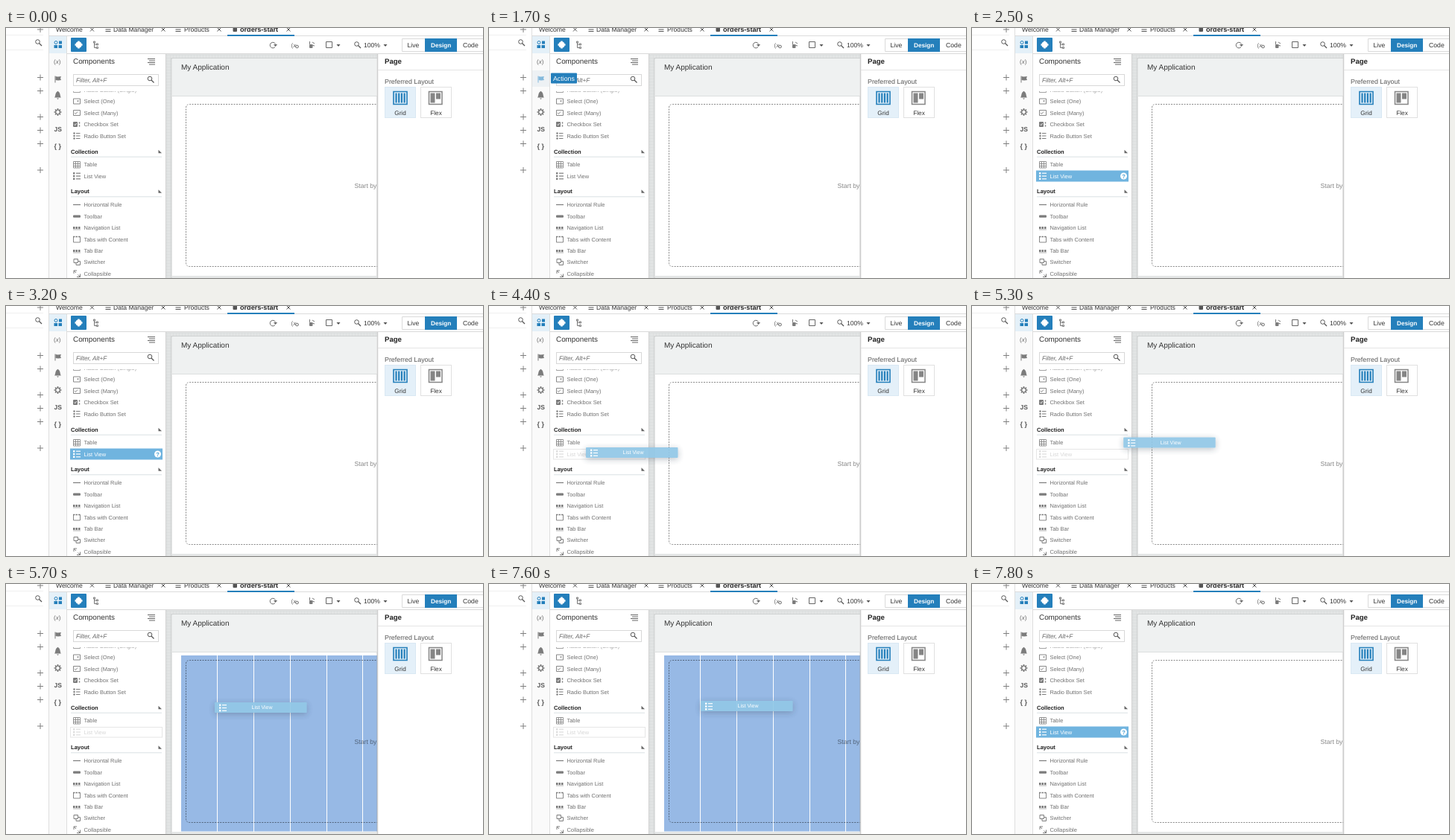
An HTML page that plays this animation: 640x336 px, repeating every 8 s.

```html
<!DOCTYPE html>
<html lang="en">
<head>
<meta charset="utf-8">
<title>Component drag</title>
<style>
html, body { margin: 0; width: 100%; height: 100%; overflow: hidden; background: #fff; }
svg { display: block; width: 640px; height: 336px; }
text { font-family: "Liberation Sans", Arial, sans-serif; text-rendering: geometricPrecision; white-space: pre; }
.b { font-weight: bold; }
.overlay { mix-blend-mode: multiply; }
</style>
</head>
<body>
<svg id="stage" viewBox="0 0 640 336" xmlns="http://www.w3.org/2000/svg"></svg>
<script>
const BLUE = '#247fbb', ICON = '#7c7c7c', DARK = '#333', HOVER = '#70b4df';

const text = (x, y, size, str, fill = DARK, extra = '') =>
  `<text x="${x}" y="${y}" font-size="${size}" fill="${fill}" ${extra}>${str}</text>`;
const rect = (x, y, w, h, fill, extra = '') =>
  `<rect x="${x}" y="${y}" width="${w}" height="${h}" fill="${fill}" ${extra}/>`;
const path = (d, stroke = ICON, width = 1, extra = '') =>
  `<path d="${d}" stroke="${stroke}" stroke-width="${width}" fill="none" ${extra}/>`;
const solid = (d, fill = ICON) => `<path d="${d}" fill="${fill}"/>`;
const circle = (x, y, r, fill, stroke = 'none') =>
  `<circle cx="${x}" cy="${y}" r="${r}" fill="${fill}" stroke="${stroke}"/>`;
const group = (id, body, extra = '') => `<g id="${id}" ${extra}>${body}</g>`;
const at = (x, y, body) => `<g transform="translate(${x} ${y})">${body}</g>`;

const plus = y => path(`M42 ${y}h8M46 ${y - 4}v8`, '#808080');
const cross = x => path(`M${x - 2.5} -.5l5 5m0-5l-5 5`, '#555');
const menu = x => path(`M${x - 3.5} -.5h7m-7 2.5h7m-7 2.5h7`, '#555', 1.2);
const lens = (x, y, c = '#555') =>
  circle(x - 1, y - 1, 2.8, 'none', c) + path(`M${x + 1} ${y + 1}l3.5 3.5`, c, 1.3);
const caret = (x, y) => solid(`M${x - 2.5} ${y - 1}h5l-2.5 3z`, '#555');

// Small palette icons, each drawn around its own centre.
const frame = 'M-4.5-3.5h9v7h-9z';
const lines = 'M-1-3.500h5.500M-1 0h5.500M-1 3.500h5.500';
const blocks = c => path('M-5 0h2.500m1 0h2.500m1 0h2.500', c, 3) + path('M-5 2.500h10', c, .6);
const icons = {
  select: c => path(frame, c, .9) + solid('M0-1h3l-1.500 2z', c),
  many: c => path(frame, c, .9) + path('M-3 0l1.500 1.500 2.500-3', c, .9),
  check: c => rect(-5, -3.5, 6, 7, c, 'rx="1"') + path('M-3.500 0l1.200 1.300 2-2.800', '#fff', .9) + path('M3.500-3v2m0 2v2', c, 1.5),
  radio: c => [-3.5, 0, 3.5].map(y => circle(-3.5, y, 1.2, c)).join('') + path(lines, c, 1.1),
  table: c => path('M-4.500-4h9v8.500h-9zM-4.500-1h9m-9 3h9M-1.500-4v8.500m3-8.500v8.500', c, .8),
  list: c => [-3.8, 0, 3.8].map(y =>
    rect(-5, y - 1.2, 2.4, 2.4, c, 'rx=".6"') + path(`M-1 ${y}h6`, c, 1.2)).join(''),
  rule: c => path('M-5 0h10', c, 1.2),
  bar: c => rect(-5, -1.5, 10, 3.2, c, 'rx="1"'),
  blocks,
  tabs: c => path('M-4.500-3.500v7.500h9v-7.500', c, .9) + path('M-5-3.500h10', c, 1.4, 'stroke-dasharray="2.500 1"'),
  switcher: c => path('M-4-4h5.500v5h-5.500zM2-1h2.500v5h-5.500v-2.500', c),
  fold: c => path('M-4 0v-4h4M-4-4l3 3M0 4.500h4.500v-4M4.500 4.500l-3-3', c)
};
const palette = [
  [98.5, 'select', 'Select (One)'], [114, 'many', 'Select (Many)'],
  [129.5, 'check', 'Checkbox Set'], [145, 'radio', 'Radio Button Set'],
  [183.5, 'table', 'Table'], [199, 'list', 'List View'],
  [237.5, 'rule', 'Horizontal Rule'], [253, 'bar', 'Toolbar'],
  [268.5, 'blocks', 'Navigation List'], [284, 'tabs', 'Tabs with Content'],
  [299.5, 'blocks', 'Tab Bar'], [314.5, 'switcher', 'Switcher'], [330, 'fold', 'Collapsible']
];
const row = ([y, icon, label], c = ICON, tc = '#707070') =>
  at(95, y, icons[icon](c)) + text(104.5, y + 2.6, 7.45, label, tc);
const hoverRow = item => rect(86, item[0] - 7.5, 124, 15, HOVER) + row(item, '#fff', '#fff') +
  circle(203.5, item[0], 4.5, '#fff') + text(203.5, item[0] + 2.8, 7.5, '?', '#4aa0d5', 'class="b" text-anchor="middle"');
const section = (y, label) => text(87, y + 2.5, 7.6, label, '#222', 'class="b"') +
  solid(`M204.500 ${y - 2.5}l4.500 4.500h-4.500z`, '#666') + path(`M87 ${y + 7}h122`, '#d9e0e4');

const puzzle = path('M0-5v10M-5 0h10M-3-3l6 6m0-6l-6 6', '#fff', 2.6);
const flag = c => path('M66 64.500v9', c) + solid('M66.500 65l3 .5 4.500-.5-1 2.500 1 2.500-4 .5-3.500-.5z', c);

const leftPanel = rect(0, 0, 57, 336, '#fff') + path('M0 9.500h50M0 29.500h50', '#f0f0f0') +
  lens(43.5, 19.5) + [2, 66.5, 84.5, 119.5, 137.5, 155.5, 191].map(plus).join('');

const tabs = text(67, 5.2, 8.6, 'Welcome') + cross(115.5) +
  menu(137) + text(144, 5.2, 8.55, 'Data Manager') + cross(211) +
  menu(231) + text(239, 5.2, 8.6, 'Products') + cross(286) +
  rect(304.5, -2, 5.5, 7, '#555', 'rx="1"') + text(314, 5.2, 9.1, 'orders-start', '#222', 'class="b"') + cross(379) +
  path('M57 10.500h583', '#dcdcdc') + rect(297, 9, 90, 2, BLUE);

const gear = circle(69.5, 113, 2.7, 'none', ICON) +
  path('M69.500 108v2m0 6v2M64.500 113h2m6 0h2M66 109.500l1.300 1.300m4.400 4.400l1.300 1.300m0-7l-1.300 1.300m-4.400 4.400l-1.300 1.300', ICON, 1.7) +
  circle(69.5, 113, 3.2, 'none', ICON);
const rail = rect(57, 11, 24, 325, '#fafafa') + path('M57.500 0v336M81.500 11v325', '#dedede') +
  rect(58, 11, 23, 23, '#e4f0f8') +
  circle(67, 19.5, 2, 'none', BLUE) + rect(71, 17.5, 4, 4, BLUE) + rect(64.5, 23, 4.5, 4, BLUE) + rect(70.5, 23, 4.5, 4, BLUE) +
  text(64, 47.5, 8, '(<tspan font-style="italic">x</tspan>)', '#666') +
  group('flag', flag(ICON)) +
  solid('M65 93.500c1.500-1 1-6 3-7.500l1.500-1.200 1.500 1.200c2 1.500 1.500 6.500 3 7.500zM68 94.500h3l-1.500 1.500z') + gear +
  text(64.5, 138.5, 8.5, 'JS', '#555', 'class="b"') + text(64.5, 161.5, 9, '{ }', '#555', 'class="b"');

const toolbar = path('M82 34.500h558', '#d9d9d9') +
  rect(87, 13, 21, 19, BLUE, 'rx="1"') + at(97.5, 22.5, puzzle) +
  path('M117.500 18h2v2h-2zM121.500 21h2v2h-2zM121.500 25.500h2v2h-2zM118.500 20v6.500h3M118.500 22h3', '#777') +
  path('M361 25.500a3.800 3.800 0 1 1 .5-4', '#666') + solid('M359 22h5l-2.500 3z', '#666') +
  text(382.5, 25.5, 8, '(<tspan font-style="italic">x</tspan>', '#666') + circle(390.5, 25, 1.8, 'none', '#666') +
  path('M407.500 18v4m3.500-3l3 2m-3.500 2l3.500 1', '#777') + rect(407, 22, 4.5, 5, ICON, 'rx="1"') +
  path('M429.500 18.500h8v8h-8z', '#666') + caret(446, 23) +
  lens(471.5, 22.5) + text(480, 26, 8.6, '100%') + caret(509, 23) +
  path('M531.500 14.500h32v17h-32zM604.500 14.500h36v17h-36z', '#dadada') +
  rect(562, 14, 43, 18, BLUE) + text(538.5, 26, 8.6, 'Live') +
  text(570, 26, 8.2, 'Design', '#fff', 'class="b"') + text(613, 26, 8.7, 'Code');

const components = rect(82, 35, 132, 301, '#fff') + text(90, 48.2, 9.9, 'Components') +
  path('M190 41.500h10M192 44h8M190 46.500h10M192 49h8', '#666') +
  rect(90.5, 62.5, 114, 15, '#fff', 'stroke="#d8d8d8"') +
  text(94, 72.5, 8.2, 'Filter, Alt+F', '#666', 'font-style="italic"') + lens(194, 69) +
  '<clipPath id="cut"><path d="M86 85h120v4H86z"/></clipPath><g clip-path="url(#cut)">' +
  row([83, 'select', 'Radio Button (Single)'], '#999', '#999') + '</g>' +
  palette.map(p => p[2] === 'List View' ? '' : row(p)).join('') +
  section(166.2, 'Collection') + section(219.8, 'Layout');

const columns = [235, 284, 333, 382, 431, 479].map((x, i, a) =>
  rect(x, 96, (a[i + 1] || 499) - x - 1, 236.5, '#97b9e5')).join('');
const canvas = rect(214, 35, 284, 301, '#e2e4e4') +
  '<pattern id="dots" width="4" height="4" patternUnits="userSpaceOnUse"><path d="M0 0h4M0 0v4" stroke="#d6d9d9"/></pattern>' +
  rect(215, 36, 283, 300, 'url(#dots)') + path('M214.500 35v301', '#d0d0d0') +
  rect(222, 41, 276, 295, '#fff', 'stroke="#c8caca"') + rect(223, 41, 275, 50, '#eff1f1') +
  path('M223 91.500h275', '#dcdede') + text(235, 56, 10, 'My Application') +
  path('M500 102.500H246.500q-5 0-5 5V315.500q0 5 5 5h253.500', '#888', 1, 'stroke-dasharray="2 1.500"') +
  text(467.5, 214.7, 8.7, 'Start by', '#888') + rect(223, 333, 275, 3, '#e5e7e7') +
  group('zone', columns, 'class="overlay"');

const choice = (x, label, fill, edge) => rect(x + .5, 79.5, 41, 41, fill, `stroke="${edge}"`) +
  text(x + 21, 117, 8.2, label, DARK, 'text-anchor="middle"');
const props = rect(498, 35, 142, 301, '#fff') + path('M498.500 35v301', '#cfcfcf', 1.5) +
  text(508, 48.2, 9.6, 'Page', '#222', 'class="b"') + path('M499 56.500h141', '#e4e4e4') +
  text(508, 74.5, 8.85, 'Preferred Layout', '#555') +
  choice(508, 'Grid', '#e4f0f9', '#d9e8f3') + choice(556, 'Flex', '#fff', '#e0e0e0') +
  path('M520 85.500h18v17h-18z', BLUE, 1.6) + path('M523.500 87.500v13m3.700-13v13m3.700-13v13m3.700-13v13', BLUE, 2.2) +
  path('M567.500 85.500h17.500v17h-17.500z', '#858585', 1.5) + rect(569.5, 87.5, 6, 13, '#858585') + rect(577, 87.5, 6, 8, '#858585');

const listView = palette[5], radioSet = palette[3];
const ghost = '<filter id="soft" x="-20%" y="-80%" width="140%" height="300%"><feDropShadow dx="0" dy="2" stdDeviation="4" flood-color="#345" flood-opacity=".35"/></filter>' +
  rect(0, 0, 123.5, 14, '#92c8e7', 'rx="1" opacity=".93" filter="url(#soft)"') +
  at(11, 7.5, icons.list('#fff')) + text(63.5, 9.2, 7, 'List View', '#fff', 'text-anchor="middle"');

const stage = document.getElementById('stage');
stage.innerHTML = rect(0, 0, 640, 336, '#fff') + leftPanel + tabs + rail + toolbar + canvas + components + props +
  group('idle', row(listView)) +
  group('faded', rect(86.5, 192.5, 123, 13.5, '#fff', 'stroke="#e6e6e6"') + row(listView, '#dcdcdc', '#d6d6d6')) +
  group('hover', hoverRow(listView)) + group('hoverRadio', hoverRow(radioSet)) +
  group('tip', rect(58, 57, 23, 22, '#edf1f4') + flag('#84b9dc') + rect(83, 60.5, 35, 14, BLUE, 'rx="1"') + text(86, 70.8, 8.8, 'Actions', '#fff')) +
  group('ghost', ghost);

const $ = id => document.getElementById(id);
const show = (id, on) => $(id).setAttribute('visibility', on ? 'visible' : 'hidden');

// Drag path: time, x, y
const drag = [[4000, 86, 192], [4800, 174, 188], [4900, 178, 187], [5100, 179, 186],
  [5200, 184, 181], [5700, 280, 159], [5900, 283, 157], [7600, 284, 157]];
function dragPoint(t) {
  const i = drag.findIndex(k => k[0] > t);
  if (i < 0) return drag[drag.length - 1].slice(1);
  const a = drag[Math.max(0, i - 1)], b = drag[i];
  const p = Math.max(0, (t - a[0]) / (b[0] - a[0]));
  return [1, 2].map(n => a[n] + (b[n] - a[n]) * p);
}

const start = performance.now();
function draw(now) {
  const t = Math.floor(Math.max(0, now - start) % 8000 / 100) * 100;
  const within = (a, b) => t >= a && t < b;
  const dragging = within(4000, 7700);
  const hover = within(2500, 4000) || t >= 7700;
  show('tip', within(1700, 1800));
  show('hoverRadio', within(2300, 2500));
  show('hover', hover);
  show('faded', dragging);
  show('idle', !dragging && !hover);
  show('zone', within(5400, 7700));
  show('ghost', dragging);
  $('ghost').setAttribute('transform', `translate(${dragPoint(t)})`);
  requestAnimationFrame(draw);
}
draw(start);
</script>
</body>
</html>
```
